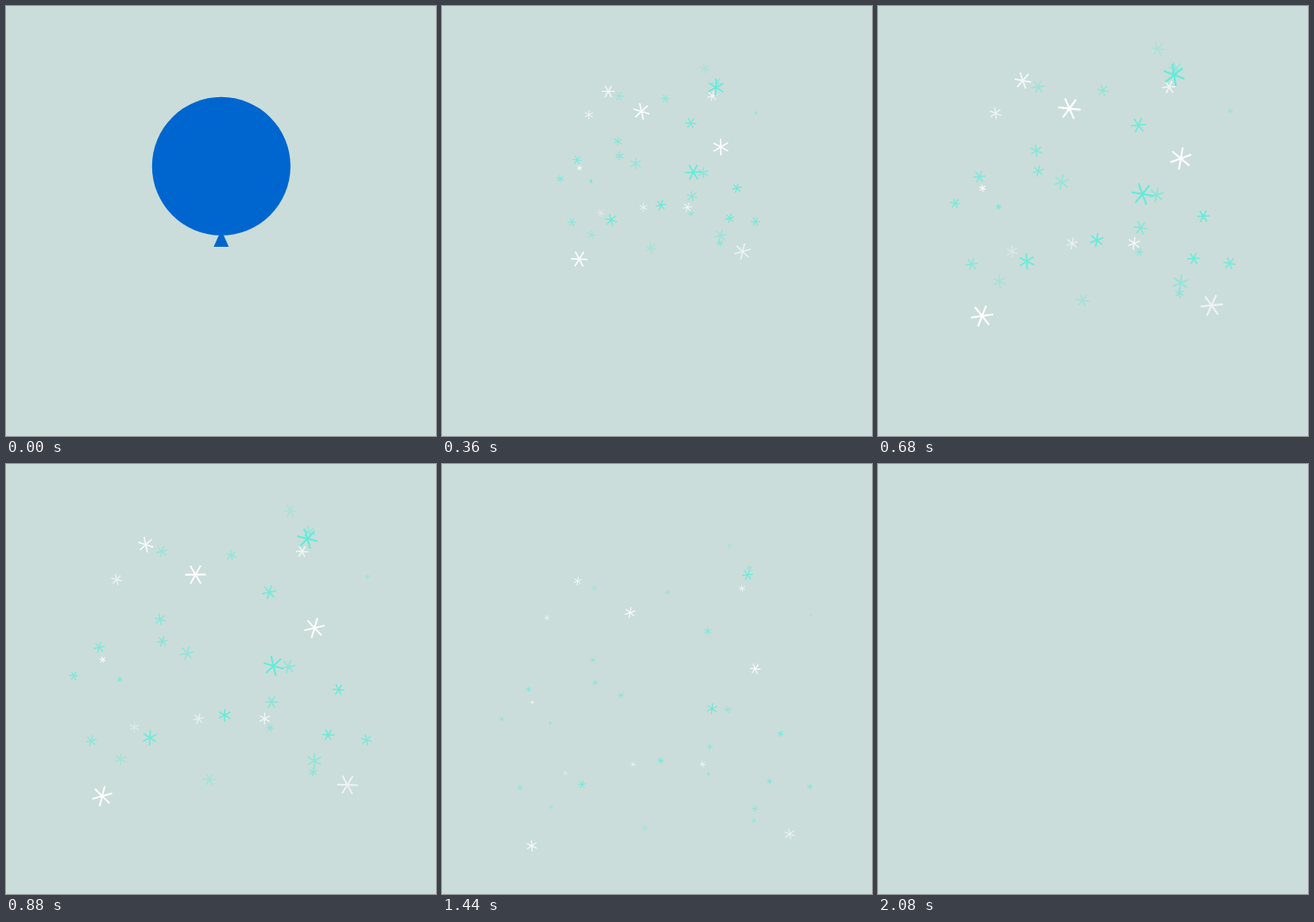
An HTML page with a canvas for the animation above (2280 ms loop, 500x500 px).

```html
<!DOCTYPE html>
<html lang="en">
<head>
<meta charset="utf-8">
<title>Balloon pop</title>
<style>
  html, body { margin: 0; width: 100%; height: 100%; overflow: hidden; background: #caddda; }
  canvas { display: block; width: 500px; height: 500px; }
</style>
</head>
<body>
<canvas id="stage" width="500" height="500"></canvas>
<script>
const ctx = document.getElementById('stage').getContext('2d');
const LOOP = 2280, STEP = 40, LAST = 2080;
const POP = 120, BURST_END = 320, SPARK_START = 280;
const TAU = Math.PI * 2;
const clamp = (v, lo = 0, hi = 1) => Math.min(hi, Math.max(lo, v));

// Run draw() with the canvas moved, scaled and turned.
function at(x, y, scale, turn, draw) {
  ctx.save();
  ctx.translate(x, y);
  ctx.rotate(turn);
  ctx.scale(scale, scale);
  draw();
  ctx.restore();
}

function seeded(seed) {
  return () => {
    seed = (seed + 0x6d2b79f5) | 0;
    let n = Math.imul(seed ^ (seed >>> 15), 1 | seed);
    n = (n + Math.imul(n ^ (n >>> 7), 61 | n)) ^ n;
    return ((n ^ (n >>> 14)) >>> 0) / 4294967296;
  };
}

const balloon = { x: 250.3, y: 186.3, r: 80.5 };

function drawBalloon(t) {
  const scale = 1 - 0.06 * Math.sin(t / POP * Math.PI);
  at(balloon.x, balloon.y, scale, 0, () => {
    ctx.fillStyle = '#0066cf';
    ctx.beginPath();
    ctx.arc(0, 0, balloon.r, 0, TAU);
    ctx.fill();
    ctx.beginPath();
    ctx.moveTo(0, 74);
    ctx.lineTo(-8.8, 93.7);
    ctx.lineTo(8.7, 93.7);
    ctx.fill();
  });
}

// One uneven star, relative to the balloon; drawn twice, the second time turned.
const tips = [[32, -181], [168, -110], [194, 25], [144, 118], [27, 178], [-127, 141], [-178, 2], [-115, -131]];
const heart = [12, 3];

function starPath() {
  const inward = ([x, y]) => [x + (heart[0] - x) * 0.3, y + (heart[1] - y) * 0.3];
  ctx.beginPath();
  ctx.moveTo(...tips[0]);
  tips.forEach((tip, i) => {
    const next = tips[(i + 1) % tips.length];
    ctx.bezierCurveTo(...inward(tip), ...inward(next), ...next);
  });
}

function drawBurst(t) {
  const left = 1 - clamp((t - POP) / 120);
  const scale = 1 - 0.4 * left * left;
  const star = (turn, color) => at(balloon.x, balloon.y, scale, turn, () => {
    ctx.fillStyle = color;
    starPath();
    ctx.fill();
  });
  star(0, `rgba(182,225,254,${clamp((BURST_END - t) / 114, 0, 0.9)})`);
  star(-0.39, `rgba(26,128,196,${clamp(0.27 + (240 - t) * 0.0048)})`);
}

const origin = { x: 255, y: 197 };
const white = '#ffffff', teal = '#62ebd9';

// The biggest sparks are placed; the small ones are scattered.
const bigSparks = [[135, 333], [342, 169], [226, 117], [374, 322], [335, 82], [302, 206]]
  .map(([x, y], i) => ({
    x: x - origin.x, y: y - origin.y, r: 13, alpha: i === 3 ? 0.65 : 1,
    color: i < 4 ? white : teal
  }));

const rand = seeded(11);
const smallSparks = Array.from({ length: 32 }, () => {
  const angle = rand() * TAU, reach = 25 + 135 * Math.sqrt(rand());
  return {
    x: reach * Math.cos(angle), y: reach * Math.sin(angle),
    r: 3 + 7 * rand(), alpha: 0.3 + 0.7 * rand(),
    color: rand() < 0.25 ? white : teal
  };
});
const sparks = [...smallSparks, ...bigSparks];

function drawSpark(r, width) {
  ctx.lineWidth = width;
  ctx.beginPath();
  for (let k = 0; k < 3; k++) {
    const x = r * Math.cos(k * TAU / 6), y = r * Math.sin(k * TAU / 6);
    ctx.moveTo(-x, -y);
    ctx.lineTo(x, y);
  }
  ctx.stroke();
}

// Outward speed decays while the fall slowly gains pace.
function drawSparks(t) {
  const s = (t - 520) / 1000;
  const spread = 1.265 * (1 - Math.exp(-3.6 * (s + 0.435)));
  const fall = 70 * s + 14 * s * s;
  const size = clamp((LAST - t) / 1300) * clamp((t - SPARK_START + STEP) / 160);
  sparks.forEach((p, i) => {
    const turn = i * 1.7 + s * (i % 2 ? 0.6 : -0.6);
    ctx.globalAlpha = p.alpha;
    ctx.strokeStyle = p.color;
    at(origin.x + p.x * spread, origin.y + p.y * spread + fall, size, turn,
      () => drawSpark(p.r, 0.7 + p.r * 0.11));
  });
  ctx.globalAlpha = 1;
}

const start = performance.now();

function frame() {
  const time = (performance.now() - start) % LOOP;
  const t = Math.min(LAST, Math.floor(time / STEP) * STEP);
  ctx.fillStyle = '#caddda';
  ctx.fillRect(0, 0, 500, 500);
  if (t < POP) drawBalloon(t);
  else if (t < BURST_END) drawBurst(t);
  if (t >= SPARK_START && t < LAST) drawSparks(t);
  requestAnimationFrame(frame);
}
frame();
</script>
</body>
</html>
```
